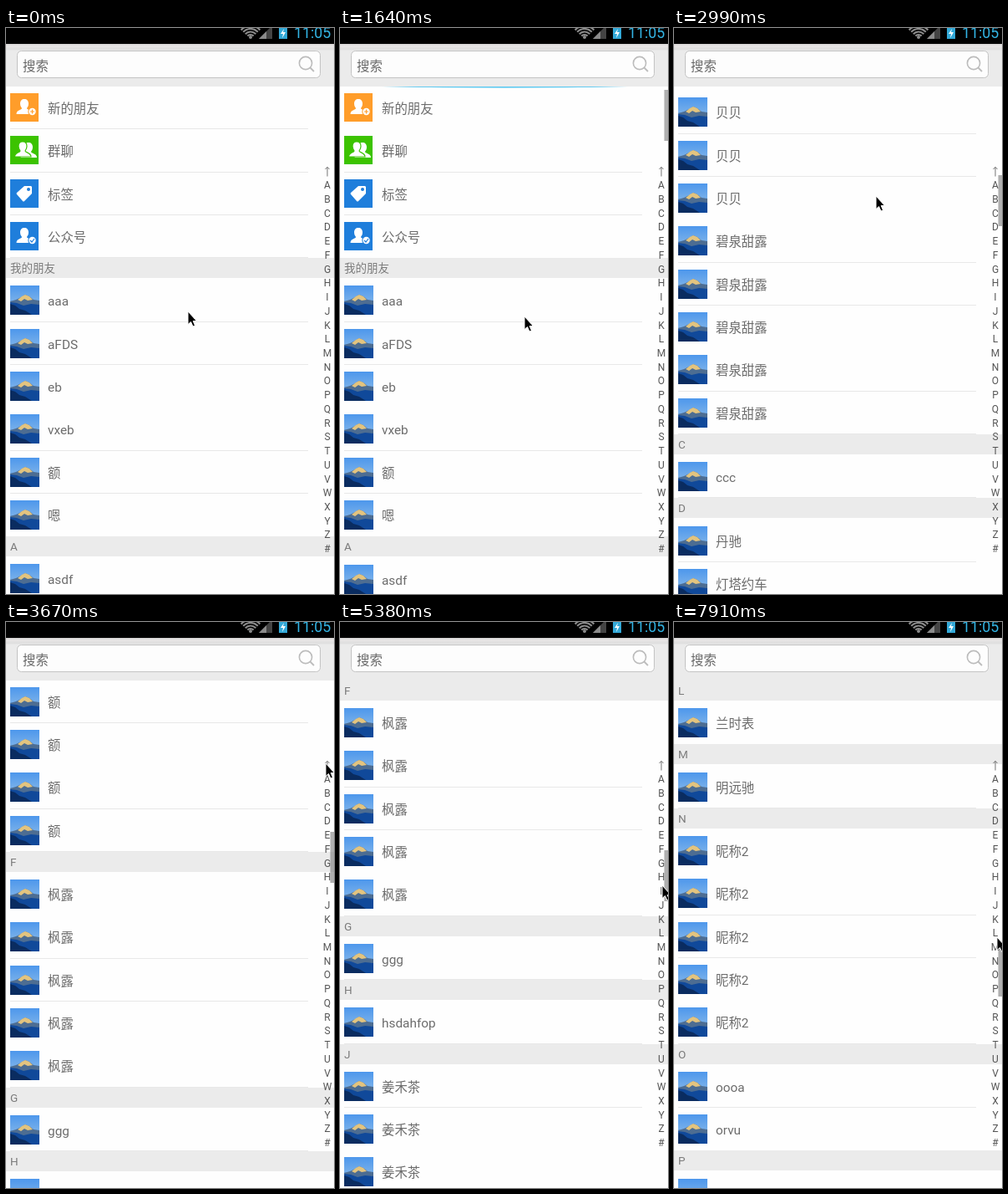
Animation of 393 by 677 pixels, one loop 8 s. Source, as an HTML page with a canvas:

```html
<!DOCTYPE html>
<html lang="zh-CN">
<head>
<meta charset="utf-8">
<title>通讯录</title>
<style>
html, body { margin: 0; width: 100%; height: 100%; overflow: hidden; background: #fefefe; }
canvas { display: block; width: 393px; height: 677px; }
</style>
</head>
<body>
<canvas id="stage"></canvas>
<script>
const W = 393, H = 677, TOP = 70, LOOP = 8000;
const ROW = 154 / 3, HEAD = 25.1;
const FONT = 'Roboto, "Noto Sans CJK SC", "Noto Sans CJK", sans-serif';

const canvas = document.getElementById('stage');
const ratio = window.devicePixelRatio || 1;
canvas.width = W * ratio;
canvas.height = H * ratio;
const ctx = canvas.getContext('2d');

const times = (name, n) => Array(n).fill(name);
const groups = [
  ['', ['新的朋友', '群聊', '标签', '公众号']],
  ['我的朋友', ['aaa', 'aFDS', 'eb', 'vxeb', '额', '嗯']],
  ['A', times('asdf', 5)],
  ['B', [...times('贝贝', 5), ...times('碧泉甜露', 5)]],
  ['C', ['ccc']],
  ['D', ['丹驰', '灯塔约车']],
  ['E', times('额', 5)],
  ['F', times('枫露', 5)],
  ['G', ['ggg']],
  ['H', ['hsdahfop']],
  ['J', times('姜禾茶', 5)],
  ['K', [...times('宽宽', 5), 'kkk']],
  ['L', ['兰时表']],
  ['M', ['明远驰']],
  ['N', times('昵称2', 5)],
  ['O', ['oooa', 'orvu']],
  ['P', times('ppp', 5)]
];

// Flatten the groups into positioned items.
const items = [], anchor = {};
let cursorY = TOP;
groups.forEach(([title, names], g) => {
  if (title) {
    anchor[title] = cursorY - TOP;
    items.push({ y: cursorY, title });
    cursorY += HEAD;
  }
  names.forEach((name, i) => {
    items.push({ y: cursorY, name, icon: g ? -1 : i });
    cursorY += ROW;
  });
});

const scrollKeys = [
  [0, 0], [60, 4], [200, 70], [450, 140], [630, 140], [810, 165], [1050, 165], [1440, 30],
  [1580, 30], [1640, 0], [1700, 0], [1950, 180], [2100, 320], [2250, 395],
  [2400, 425], [2490, 426.8], [2600, 490], [2700, 600], [2800, 740], [2900, 860],
  [2990, 942], [3100, 1005], [3230, 1030], [3320, 1040], [3420, 1180], [3520, 1400],
  [3600, 1540], [3670, 1638.8], [3800, 1740], [3950, 1800], [4090, 1820]
];
const jumps = [
  [4260, 0], [4920, anchor.B], [5050, anchor.C], [5140, anchor.D], [5230, anchor.E],
  [5320, anchor.F], [5440, anchor.J], [6800, anchor.K], [7690, anchor.L]
];
const pointerKeys = [
  [0, 218, 340], [60, 218, 336], [450, 218, 200], [630, 218, 200], [810, 218, 175],
  [1050, 218, 175], [1440, 220, 310], [1580, 220, 310], [1640, 221, 346],
  [1700, 221, 346], [1950, 222, 166], [2150, 222, 166], [2400, 222, 321],
  [2490, 222, 321], [2700, 228, 230], [2990, 242, 202], [3230, 245, 320],
  [3320, 248, 320], [3500, 280, 190], [3670, 383, 170], [4560, 383, 170],
  [4740, 384, 206], [4920, 384, 208], [5380, 386, 316], [5680, 386, 340],
  [6750, 386, 340], [6900, 386, 356], [7570, 386, 356], [7850, 387, 378]
];

function sample(keys, t, col = 1) {
  const i = keys.findIndex(k => k[0] > t);
  if (i < 0) return keys[keys.length - 1][col];
  const a = keys[i - 1], b = keys[i];
  return a[col] + (b[col] - a[col]) * (t - a[0]) / (b[0] - a[0]);
}

function scrollAt(t) {
  const jump = jumps.filter(j => j[0] <= t).pop();
  return jump ? jump[1] : sample(scrollKeys, t);
}

// The scroll bar waits 300 ms after the last movement, then fades.
function barAlpha(t) {
  if (t < 60) return 0;
  if (t < 4260) return 1;
  const last = jumps.filter(j => j[0] <= t).pop()[0];
  return Math.max(0, Math.min(1, 1 - (t - last - 300) / 230));
}

function rect(x, y, w, h, fill) {
  ctx.fillStyle = fill;
  ctx.fillRect(x, y, w, h);
}

function text(str, x, y, size, fill, align = 'left') {
  ctx.font = `${size}px ${FONT}`;
  ctx.textAlign = align;
  ctx.fillStyle = fill;
  ctx.fillText(str, x, y);
}

function shape(d, fill, stroke, width = 1) {
  const path = new Path2D(d);
  if (fill) { ctx.fillStyle = fill; ctx.fill(path); }
  if (stroke) { ctx.strokeStyle = stroke; ctx.lineWidth = width; ctx.stroke(path); }
}

function disc(x, y, r, fill) {
  ctx.beginPath();
  ctx.arc(x, y, r, 0, Math.PI * 2);
  ctx.fillStyle = fill;
  ctx.fill();
}

function at(x, y, draw) {
  ctx.save();
  ctx.translate(x, y);
  draw();
  ctx.restore();
}

const PERSON = 'M17 7C20 7 22 9 22 12.500C22 15 21 16.500 20 18C20 20 27 20 27 25H7.500C7.500 20 14 20 14 18C13 16.500 12 15 12 12.500C12 9 14 7 17 7Z';
const iconColors = ['#ff9d2a', '#3cc300', '#1f7edb', '#1f7edb'];

function menuIcon(kind) {
  const color = iconColors[kind];
  rect(0, 0, 34, 34, color);
  if (kind === 2) {
    shape('M8 16L17 8L25 8L26 9V17L17 26Q16 27 15 26L8 18Q7 17 8 16Z', '#fff');
    disc(22, 12, 2, color);
    return;
  }
  if (kind === 1) at(5, 1, () => shape(PERSON, '#fff'));
  if (kind === 1) at(-2, 0, () => shape(PERSON, '#fff', color, 1.2));
  else shape(PERSON, '#fff');
  if (kind === 1) return;
  disc(26.5, 22, 5.2, color);
  disc(26.5, 22, 4.2, '#fff');
  shape(kind ? 'M24 22L26 24L29 20' : 'M24 22H29M26.500 19.500V24.500', null, color, 1.2);
}

function photo() {
  const sky = ctx.createLinearGradient(0, 0, 0, 35);
  sky.addColorStop(0, '#4d97ec');
  sky.addColorStop(0.5, '#75aeea');
  sky.addColorStop(0.65, '#2b68b0');
  sky.addColorStop(1, '#0d4592');
  rect(0, 0, 35, 35, sky);
  shape('M0 19L7 17L13 14L18 11L23 13L28 17L35 18V27H0Z', '#4d6d92');
  shape('M9 17L14 13L18 11L23 13L27 17L21 18L17 16L13 19Z', '#e3c47f');
  shape('M0 20L8 21L16 24L25 22L35 23V35H0Z', '#10499a');
  shape('M0 22L6 24L11 28L18 30L26 35H0Z', '#0a2c60');
}

function drawItem(item, scroll) {
  const exact = item.y - scroll, y = Math.round(exact);
  if (exact > H || exact < TOP - ROW - 1) return;
  if (item.title) {
    rect(0, y, W, 24, '#ebebeb');
    text(item.title, 5, y + 17, 13.5, '#7b7b7b');
    return;
  }
  if (item.icon < 0) at(5, y + 8, photo);
  else at(5, y + 8, () => menuIcon(item.icon));
  text(item.name, 50, y + 31.5, 15.4, '#6c6c6c');
  // Hairlines vanish at certain subpixel phases of the scaled screen.
  const end = exact + ROW, phase = end - Math.floor(end);
  if (phase < 0.27 || phase > 0.46) rect(5, Math.round(end) - 1, 357, 1, '#e8e8e8');
}

function drawTop() {
  rect(0, 0, W, TOP, '#ebebeb');
  rect(0, 0, W, 19, '#000');
  const shade = ctx.createLinearGradient(0, 19, 0, 27);
  shade.addColorStop(0, '#d2d0d0');
  shade.addColorStop(0.3, '#e8e6e6');
  shade.addColorStop(0.8, '#dedede');
  shade.addColorStop(1, '#ebebeb');
  rect(0, 19, W, 8, shade);

  for (const r of [5, 8.5, 12, 15.5]) {
    ctx.beginPath();
    ctx.arc(293, 13, r, -Math.PI * 0.76, -Math.PI * 0.24);
    ctx.strokeStyle = '#8b8b8b';
    ctx.lineWidth = 2.2;
    ctx.stroke();
  }
  disc(293, 11, 2, '#8b8b8b');
  shape('M303 13L319 -3V13Z', '#444');
  shape('M303 13L312 4V13Z', '#8b8b8b');
  rect(327, 0, 10, 13, '#33a9d8');
  shape('M333 1L329 7H332L331 12L335 5H332Z', '#fff');
  text('11:05', 345, 12.3, 17.8, '#33b5e5');

  ctx.beginPath();
  ctx.roundRect(13.5, 27.5, 363, 32, 5);
  ctx.fillStyle = '#fdfdfd';
  ctx.fill();
  ctx.strokeStyle = '#c3c3c3';
  ctx.lineWidth = 1;
  ctx.stroke();
  text('搜索', 20, 50.5, 15.4, '#6a6a6a');
  ctx.beginPath();
  ctx.arc(359, 42, 7.6, 0, Math.PI * 2);
  ctx.strokeStyle = '#bcbcbc';
  ctx.lineWidth = 1.6;
  ctx.stroke();
  shape('M364.500 47.500L369 52', null, '#bcbcbc', 1.8);
}

function drawIndex() {
  [...'ABCDEFGHIJKLMNOPQRSTUVWXYZ#'].forEach((letter, i) =>
    text(letter, 385, 192.2 + i * 16.73, 12, '#555', 'center'));
  shape('M385 177.500V166.500M382.500 169L385 166.300L387.500 169', null, '#666', 0.9);
}

function drawGlow(t) {
  if (t < 1620 || t > 1820) return;
  ctx.globalAlpha = t < 1700 ? 1 : (1820 - t) / 120;
  const glow = ctx.createLinearGradient(50, 0, 345, 0);
  glow.addColorStop(0, 'rgba(90,200,240,0)');
  glow.addColorStop(0.15, 'rgba(90,200,240,.85)');
  glow.addColorStop(0.85, 'rgba(90,200,240,.85)');
  glow.addColorStop(1, 'rgba(90,200,240,0)');
  shape('M50 70Q197 73.500 345 70Z', glow);
  rect(50, 70, 295, 1, glow);
  ctx.globalAlpha = 1;
}

function drawPointer(t) {
  at(Math.round(sample(pointerKeys, t, 1)), Math.round(sample(pointerKeys, t, 2)), () =>
    shape('M0 -1V14.500L3.500 11.500L6 17L8.500 16L6.200 10.500H10.500Z', '#000', '#fff', 1));
}

function render(now) {
  const t = now % LOOP, scroll = scrollAt(t);
  ctx.setTransform(ratio, 0, 0, ratio, 0, 0);
  rect(0, 0, W, H, '#fefefe');
  items.forEach(item => drawItem(item, scroll));
  drawTop();
  drawGlow(t);
  drawIndex();
  rect(388.5, Math.round(74 + scroll * 0.108), 4.5, 61, `rgba(120,120,120,${0.58 * barAlpha(t)})`);
  drawPointer(t);
  requestAnimationFrame(() => render(performance.now()));
}
render(0);
</script>
</body>
</html>
```
